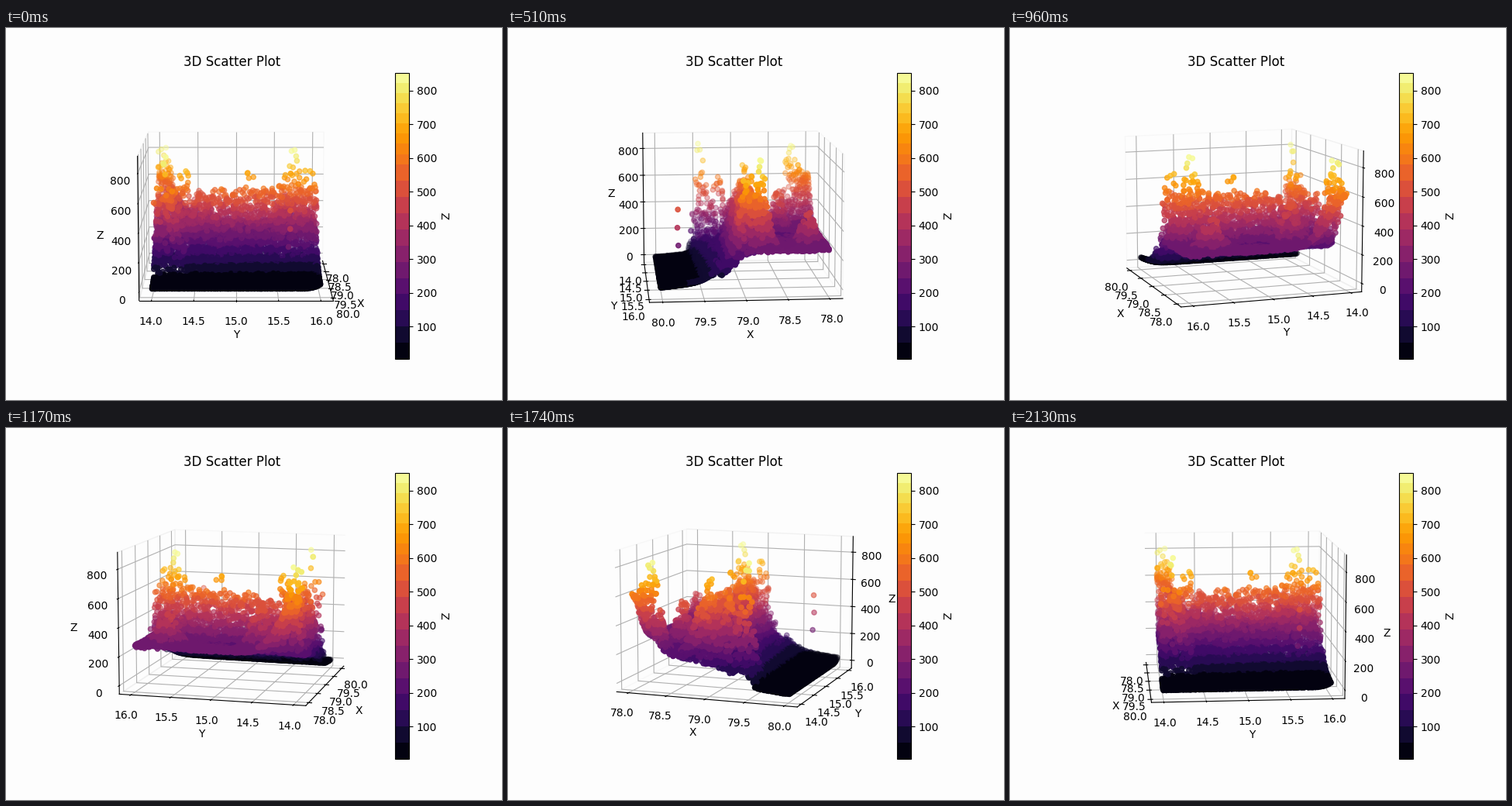
A matplotlib script for the animation above (2.16 s loop, 640 by 480 pixels).

```python
import numpy as np
import matplotlib.pyplot as plt
from matplotlib.animation import FuncAnimation
from matplotlib.colors import ListedColormap

FRAMES, STEP_MS = 72, 30
SIDE = 86
Z_MIN, Z_MAX = 3, 853
PAPER = "#fdfdfd"

# main hills: x, y, height above the floor
HILLS = [
    (78.80, 15.70, 620), (79.00, 15.90, 560), (78.85, 15.20, 540),
    (78.87, 14.35, 560), (79.43, 14.12, 740), (79.20, 14.20, 540),
    (78.24, 14.06, 510), (78.20, 15.65, 240), (78.45, 14.55, 320),
]


def bump(x, y, cx, cy, sx=.085, sy=.12):
    return np.exp(-((x - cx) / sx) ** 2 / 2 - ((y - cy) / sy) ** 2 / 2)


def falloff(x, edge, width):
    return 1 / (1 + np.exp((x - edge) / width))


def floor(x, y):
    """Gentle slope ending in a cliff in the south, a smooth slope in the north."""
    south = (250 - 110 * (x - 78)) * falloff(x, 79.53, .02)
    north = 250 * falloff(x, 79.2, .12)
    north_share = (y - 14) / 2
    inland = south + (north - south) * north_share
    shore = 50 * (80 - x) + 32 * np.exp((y - 16) / .08)
    return inland + shore * (x > 79.3) + 340 * bump(x, y, 78, 14, .16, .22)


def relief(x, y):
    ridge = 360 * bump(x, 0, 78.87, 0, np.where(x > 78.87, .19, .13))
    ridge *= 1 + .08 * np.sin(9 * y) + .05 * np.sin(23 * y + 1)
    hills = [h * bump(x, y, cx, cy) for cx, cy, h in HILLS]
    return np.max([ridge, *hills], axis=0) * falloff(x, 79.56, .02)


def cloud():
    rng = np.random.default_rng(5)
    gx, gy = np.meshgrid(np.linspace(77.99, 80.01, SIDE), np.linspace(14, 16, SIDE))
    wobble = rng.uniform(-.012, .012, (2, SIDE ** 2))
    x = np.clip(gx.ravel() + wobble[0], 77.99, 80.01)
    y = np.clip(gy.ravel() + wobble[1], 14, 16)

    # dense at the foot and the top, sparser summits towards the east
    sharp = 2 + 8 * np.maximum(x - 79, 0)
    lift = np.sin(np.pi / 2 * rng.random(x.size)) ** sharp
    rough = 18 * falloff(x, 79.5, .05) * rng.random(x.size)
    z = floor(x, y) + relief(x, y) * lift + rough

    # a few stray points near the shore, and the two summits
    stray_x, stray_y = rng.normal([[79.8], [15.64]], .015, (2, 3))
    x = np.r_[x, stray_x, 79.45, 78.80]
    y = np.r_[y, stray_y, 14.15, 15.73]
    z = np.r_[z, np.linspace(265, 516, 3), Z_MAX, Z_MAX]
    return x, y, np.clip(z, Z_MIN, Z_MAX)


def banded_inferno():
    """Inferno in flat steps, finer in the bright third."""
    edges = np.r_[np.linspace(0, .68, 13), np.linspace(.68, 1, 10)[1:]]
    mids = (edges[1:] + edges[:-1]) / 2
    slot = np.searchsorted(edges, (np.arange(512) + .5) / 512) - 1
    return ListedColormap(plt.get_cmap("inferno")(mids[slot]))


fig = plt.figure(figsize=(6.4, 4.8), dpi=100, facecolor=PAPER)
ax = fig.add_subplot(projection="3d", facecolor=PAPER)
x, y, z = cloud()
dots = ax.scatter(x, y, z, c=z, cmap=banded_inferno())
ax.set(xlabel="X", ylabel="Y", zlabel="Z", title="3D Scatter Plot")
for axis in (ax.xaxis, ax.yaxis, ax.zaxis):
    axis.pane.set_fill(False)
fig.colorbar(dots, label="Z")


def turn(i):
    ax.view_init(elev=10, azim=i * 360 / FRAMES)
    return dots,


anim = FuncAnimation(fig, turn, frames=FRAMES, interval=STEP_MS,
                     repeat=True, repeat_delay=0)
plt.show()
```
